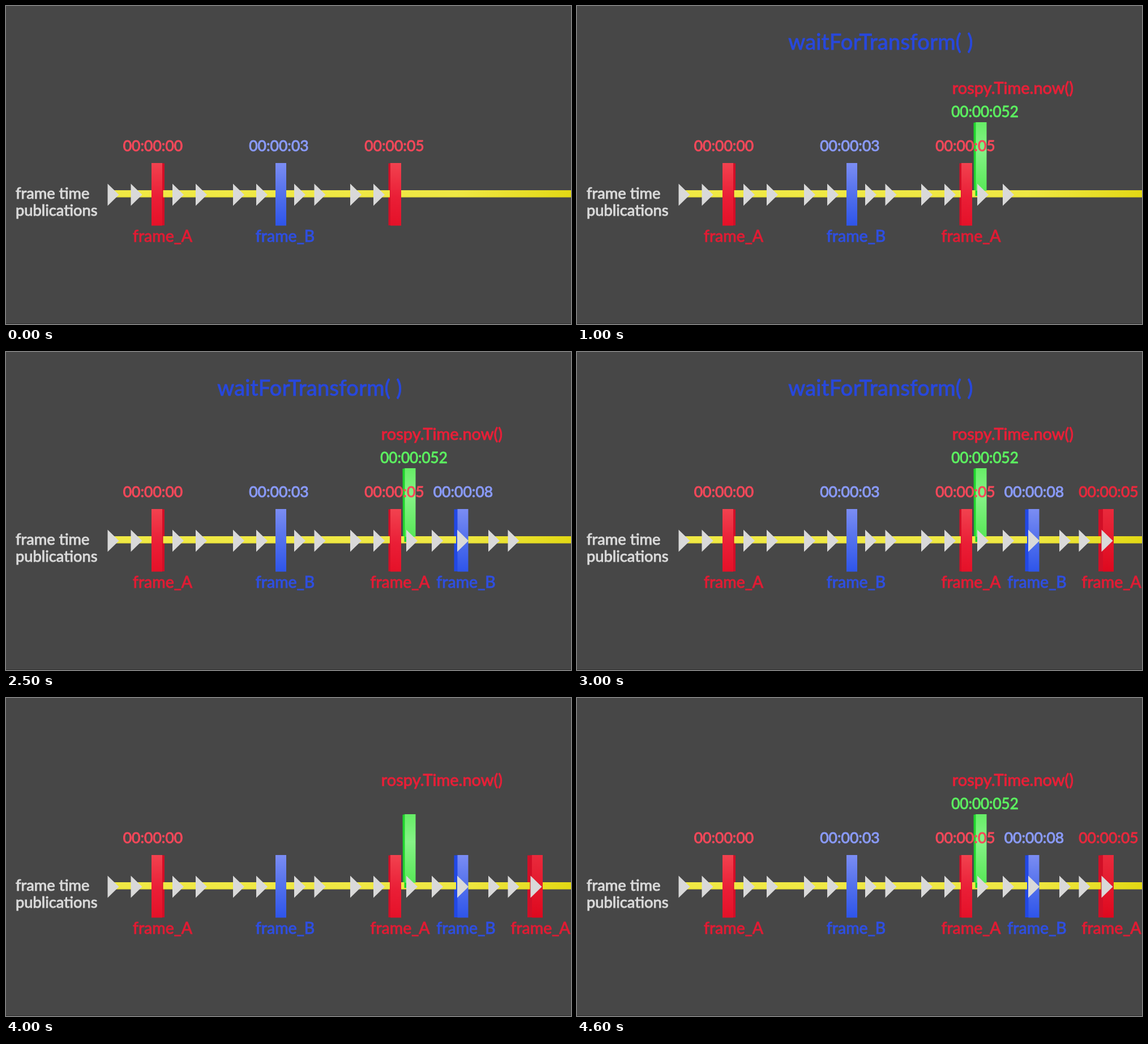
Write an HTML page that moves like this. It is 998 px wide and 561 px high and loops after 4800 ms.

```html
<!DOCTYPE html>
<html lang="en">
<head>
<meta charset="utf-8">
<title>Frame time publications</title>
<style>
  html, body { margin: 0; width: 100%; height: 100%; overflow: hidden; background: #474747; }
  svg { display: block; width: 100%; height: 100%; }
  text {
    font: 26.5px Lato, "Open Sans", sans-serif;
    text-anchor: middle;
    stroke: currentColor; fill: currentColor; stroke-width: 1px;
  }
  .red { color: #e01c34; }
  .blue { color: #2f4fe0; }
  .name { font-size: 28.5px; }
  .axis { color: #d9d9d9; font-size: 27.3px; text-anchor: start; }
  .title { color: #2848dc; font-size: 38px; letter-spacing: .3px; }
  .call { color: #e62038; font-size: 29px; }
  .warm { color: #f5485a; }
  .cool { color: #8a9bfb; }
  .deep { color: #e8293d; }
  .stamp { color: #5cf060; font-size: 26px; }
  .arrow { fill: #d9d9d9; }
  .redSide { fill: #d10f27; }
  .blueSide { fill: #2148e6; }

  [class^="at"], .title, .blink { animation: 4800ms step-end infinite; }
  .at500 { animation-name: in500; }
  .at1000 { animation-name: in1000; }
  .at1500 { animation-name: in1500; }
  .at2000 { animation-name: in2000; }
  .at2500 { animation-name: in2500; }
  .at3000 { animation-name: in3000; }
  .title { animation-name: title; }
  .blink { animation-name: blink; }

  @keyframes in500 { 0% { opacity: 0; } 10.4167%, 100% { opacity: 1; } }
  @keyframes in1000 { 0% { opacity: 0; } 20.8333%, 100% { opacity: 1; } }
  @keyframes in1500 { 0% { opacity: 0; } 31.25%, 100% { opacity: 1; } }
  @keyframes in2000 { 0% { opacity: 0; } 41.6667%, 100% { opacity: 1; } }
  @keyframes in2500 { 0% { opacity: 0; } 52.0833%, 100% { opacity: 1; } }
  @keyframes in3000 { 0% { opacity: 0; } 62.5%, 100% { opacity: 1; } }
  @keyframes title { 0% { opacity: 0; } 20.8333% { opacity: 1; } 72.9167%, 100% { opacity: 0; } }
  @keyframes blink {
    0% { opacity: 1; }
    83.3333% { opacity: 0; }
    87.5% { opacity: 1; }
    91.6667% { opacity: 0; }
    95.8333%, 100% { opacity: 1; }
  }
</style>
</head>
<body>
<svg viewBox="0 0 998 561" preserveAspectRatio="none">
  <defs>
    <linearGradient id="redFace" x2="0" y2="1">
      <stop stop-color="#f2424f"/><stop offset=".55" stop-color="#ea1e36"/><stop offset="1" stop-color="#e51128"/>
    </linearGradient>
    <linearGradient id="deepFace" x2="0" y2="1">
      <stop stop-color="#e92a3c"/><stop offset="1" stop-color="#de081e"/>
    </linearGradient>
    <linearGradient id="blueFace" x2="0" y2="1">
      <stop stop-color="#7b8df3"/><stop offset=".5" stop-color="#5270ec"/><stop offset="1" stop-color="#2e55ea"/>
    </linearGradient>
    <linearGradient id="greenFace" x2="0" y2="1">
      <stop stop-color="#66ee66"/><stop offset=".4" stop-color="#86f287"/><stop offset="1" stop-color="#58e957"/>
    </linearGradient>
    <linearGradient id="line">
      <stop stop-color="#f0e944"/><stop offset=".75" stop-color="#efe844"/>
      <stop offset=".88" stop-color="#e9e02c"/><stop offset="1" stop-color="#e3d914"/>
    </linearGradient>
    <path id="tri" class="arrow" d="M0 313.5 20 333 0 352.5Z"/>
    <rect id="face" y="277" width="19" height="110.5"/>
  </defs>

  <rect width="998" height="561" fill="#474747"/>
  <rect y="560" width="998" height="1" fill="#303030"/>

  <!-- side faces, far half -->
  <rect class="redSide" x="275" y="277.5" width="5" height="109.5"/>
  <rect class="redSide" x="675.5" y="277.5" width="5" height="109.5"/>
  <g class="at1500"><rect class="blueSide" x="791.5" y="277.5" width="7" height="109.5"/></g>
  <g class="at3000"><rect class="redSide" x="921" y="277.5" width="9" height="109.5"/></g>

  <!-- time line -->
  <rect x="188" y="325" width="810" height="12.5" fill="url(#line)"/>
  <rect x="188" y="336" width="810" height="1.5" fill="#d6cd25" opacity=".3"/>

  <!-- front faces with the near half of their sides -->
  <g class="at500">
    <path d="M700.5 206 705 205V326H707.5V335H703.5V325H701Z" fill="#20d52d"/>
    <rect x="704.5" y="205" width="19" height="121" fill="url(#greenFace)"/>
  </g>
  <rect class="redSide" x="275" y="277.5" width="2.5" height="109.5"/>
  <use href="#face" x="257" fill="url(#redFace)"/>
  <use href="#face" x="476" fill="url(#blueFace)"/>
  <rect class="redSide" x="678" y="277.5" width="2.5" height="109.5"/>
  <use href="#face" x="679" fill="url(#redFace)"/>
  <g class="at1500">
    <rect class="blueSide" x="795" y="277.5" width="3.5" height="109.5"/>
    <use href="#face" x="797.5" fill="url(#blueFace)"/>
  </g>
  <g class="at3000">
    <rect class="redSide" x="925.5" y="277.5" width="4.5" height="109.5"/>
    <use href="#face" x="929" fill="url(#deepFace)"/>
  </g>

  <!-- arrows -->
  <use href="#tri" x="179.5"/>
  <use href="#tri" x="220.5"/>
  <use href="#tri" x="294"/>
  <use href="#tri" x="335"/>
  <use href="#tri" x="401"/>
  <use href="#tri" x="442"/>
  <use href="#tri" x="509"/>
  <use href="#tri" x="544.5"/>
  <use href="#tri" x="608"/>
  <use href="#tri" x="649"/>
  <g class="at500"><use href="#tri" x="707"/></g>
  <g class="at1000"><use href="#tri" x="752"/></g>
  <g class="at1500"><use href="#tri" x="797"/></g>
  <g class="at2000"><use href="#tri" x="852"/></g>
  <g class="at2500"><use href="#tri" x="886.5"/></g>
  <g class="at3000"><use href="#tri" x="926.5"/></g>

  <!-- labels -->
  <text class="axis" x="17" y="340">frame time</text>
  <text class="axis" x="17" y="370">publications</text>
  <text class="title" x="536.5" y="77">waitForTransform( )</text>
  <g class="at500"><text class="call" x="770" y="155">rospy.Time.now()</text></g>

  <text class="name red" x="276.5" y="416">frame_A</text>
  <text class="name blue" x="493" y="416">frame_B</text>
  <g class="at1000"><text class="name red" x="696" y="416">frame_A</text></g>
  <g class="at1500"><text class="name blue" x="812.5" y="416">frame_B</text></g>
  <g class="at3000"><text class="name red" x="944" y="416">frame_A</text></g>

  <!-- time stamps -->
  <text class="warm" x="259.5" y="255.5">00:00:00</text>
  <g class="blink">
    <text class="cool" x="482" y="255.5">00:00:03</text>
    <text class="warm" x="686" y="255.5">00:00:05</text>
    <g class="at500"><text class="stamp" x="720.5" y="196">00:00:052</text></g>
    <g class="at1500"><text class="cool" x="807.5" y="255.5">00:00:08</text></g>
    <g class="at3000"><text class="deep" x="939" y="255.5">00:00:05</text></g>
  </g>
</svg>
</body>
</html>
```
